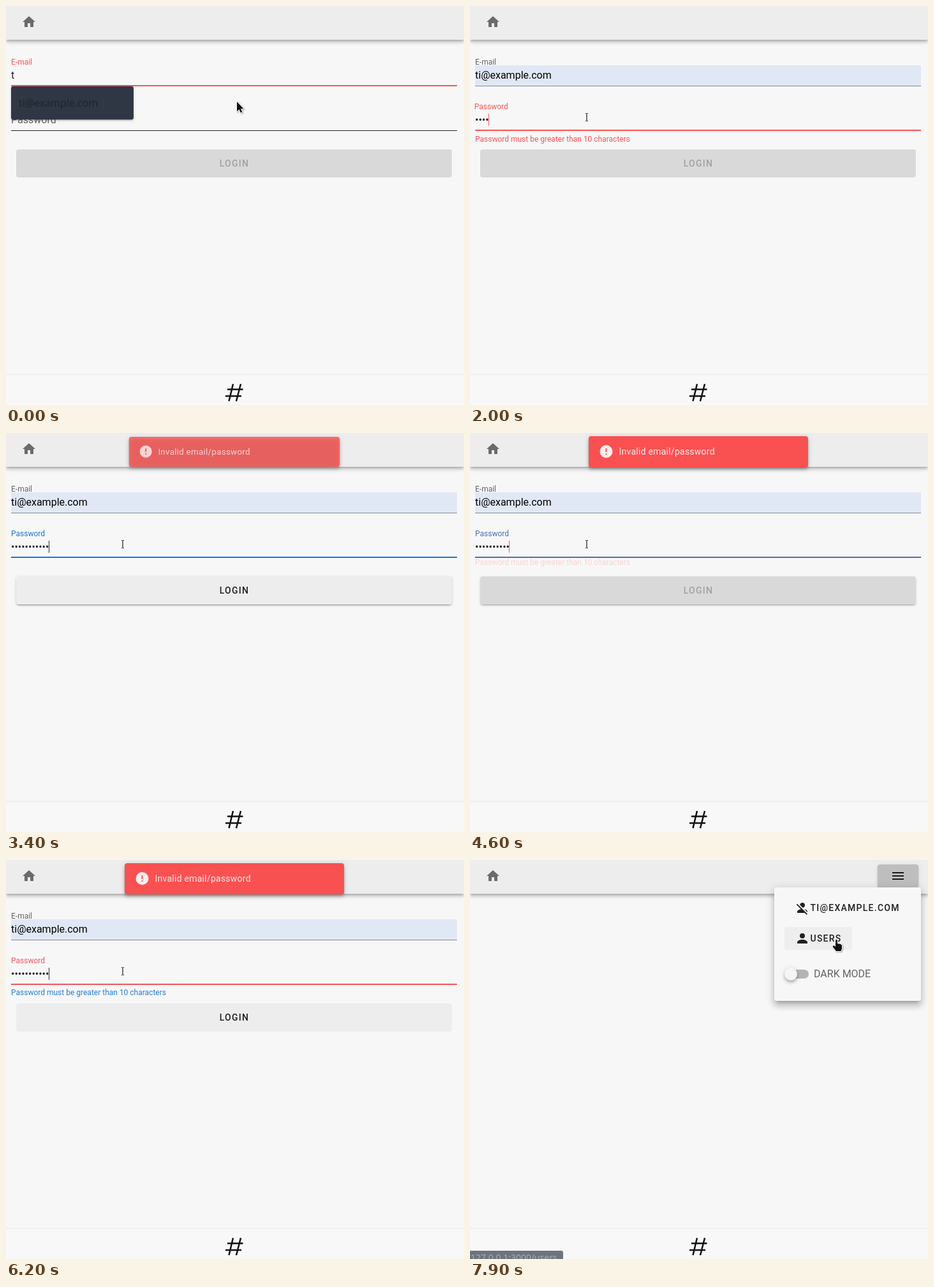
Write an HTML page with a canvas that moves like this. It is 718 by 626 pixels and loops after 8 s.

```html
<!DOCTYPE html>
<html lang="en">
<head>
<meta charset="utf-8">
<title>Login form</title>
<style>
html, body { margin: 0; width: 100%; height: 100%; overflow: hidden; background: #f7f7f7; }
canvas { display: block; }
</style>
</head>
<body>
<canvas id="stage" width="718" height="626"></canvas>
<script>
const ctx = document.getElementById('stage').getContext('2d');
const LOOP = 8000;
const MAIL = 'ti@example.com';
const RED = [255, 82, 82], BLUE = [25, 118, 210], GREY = [102, 102, 102];
const INK = 'rgba(0,0,0,.87)';
const ROBOTO = 'Roboto, sans-serif', UI = '"Open Sans", "Noto Sans", sans-serif';

// Moments of the story, in ms
const PICK = 600, FOCUS = 930, SNACK = 3333, NAV = 6560, MENU = 7380, HOVER = 7760;
const typing = [[FOCUS, 0], [1490, 1], [1680, 2], [1850, 3], [1980, 4], [2080, 5], [2180, 6], [2280, 7],
  [2380, 9], [2680, 10], [2930, 11], [4580, 10], [4680, 9], [4890, 10], [5170, 11],
  [5790, 10], [5880, 9], [6050, 10], [6195, 11]];
const validity = [[-999, false], [1490, true], [2930, false], [4580, true], [5170, false], [5790, true], [6195, false]];
const pointer = [[30, 362, 150], [560, 170, 150], [650, 170, 150], [880, 181, 172], [6850, 181, 172],
  [7250, 671, 25], [7450, 671, 25], [7830, 573, 125]];

const icons = {
  home: 'M10,20V14H14V20H19V12H22L12,3L2,12H5V20H10Z',
  menu: 'M3,6H21V8H3V6M3,11H21V13H3V11M3,16H21V18H3V16Z',
  alert: 'M13,13H11V7H13M13,17H11V15H13M12,2A10,10 0 0,0 2,12A10,10 0 0,0 12,22A10,10 0 0,0 22,12A10,10 0 0,0 12,2Z',
  user: 'M12,4A4,4 0 0,1 16,8A4,4 0 0,1 12,12A4,4 0 0,1 8,8A4,4 0 0,1 12,4M12,14C16.42,14 20,15.79 20,18V20H4V18C4,15.79 7.58,14 12,14Z',
  userOff: 'M12,4A4,4 0 0,1 16,8C16,9.95 14.6,11.58 12.75,11.93L8.07,7.25C8.42,5.4 10.05,4 12,4M12.28,14L18.28,20L20,21.72L18.73,23L15.73,20H4V18C4,16.16 6.5,14.61 9.87,14.14L2.78,7.05L4.05,5.78L12.28,14M20,18V19.18L15.14,14.32C18,14.93 20,16.35 20,18Z',
  arrow: 'M0,0V15.5L3.6,12.2L6,17.6L8.3,16.6L6,11.3H10.5Z',
  hand: 'M0,1Q1.5,-1.4 3,1V6L8,7Q10,7.5 10,10V14L8.5,18H1L-4.5,11Q-4,8.5 -1.8,9.5L0,11Z'
};
for (const k in icons) icons[k] = new Path2D(icons[k]);

const clamp = v => Math.max(0, Math.min(1, v));
const lerp = (a, b, k) => a + (b - a) * k;
const mix = (a, b, k) => `rgb(${a.map((v, i) => Math.round(lerp(v, b[i], k)))})`;

function bezier(x1, y1, x2, y2) {
  const at = (u, a, b) => 3 * (1 - u) * (1 - u) * u * a + 3 * (1 - u) * u * u * b + u * u * u;
  return x => {
    let lo = 0, hi = 1;
    for (let i = 0; i < 20; i++) {
      const m = (lo + hi) / 2;
      if (at(m, x1, x2) < x) lo = m; else hi = m;
    }
    return at(lo, y1, y2);
  };
}
const swing = bezier(.25, .8, .5, 1), ease = bezier(.25, .1, .25, 1);
const decel = bezier(0, 0, .2, 1), smooth = bezier(.42, 0, .58, 1);
const run = (t, from, ms, curve = swing) => curve(clamp((t - from) / ms));
const latest = (list, t) => list.filter(e => e[0] <= t).pop();

function text(s, x, y, size, color, o = {}) {
  ctx.font = `${o.weight || 400} ${size}px ${o.font || ROBOTO}`;
  ctx.letterSpacing = (o.gap || 0) + 'px';
  ctx.fillStyle = color;
  ctx.fillText(s, x, y);
}

function rect(x, y, w, h, color, r = 0) {
  ctx.fillStyle = color;
  ctx.beginPath();
  ctx.roundRect(x, y, w, h, r);
  ctx.fill();
}

// Each layer: offset, blur, spread, alpha
const low = [[3, 1, -2, .2], [2, 2, 0, .14], [1, 5, 0, .12]];
const mid = [[2, 4, -1, .2], [4, 5, 0, .14], [1, 10, 0, .12]];
const high = [[5, 5, -3, .2], [8, 10, 1, .14], [3, 14, 2, .12]];

function shadow(x, y, w, h, r, layers, k = 1) {
  const far = 2000, scale = ctx.getTransform().a || 1;
  for (const [dy, blur, spread, a] of layers) {
    ctx.save();
    ctx.shadowColor = `rgba(0,0,0,${a * k})`;
    ctx.shadowBlur = blur;
    ctx.shadowOffsetX = far;
    ctx.shadowOffsetY = dy;
    rect(x - far / scale - spread, y - spread, w + 2 * spread, h + 2 * spread, '#000', r);
    ctx.restore();
  }
}

function icon(name, x, y, color) {
  ctx.save();
  ctx.translate(x, y);
  ctx.fillStyle = color;
  ctx.fill(icons[name], 'evenodd');
  ctx.restore();
}

function frame() {
  rect(0, 0, 718, 626, '#f7f7f7');
  shadow(0, 0, 718, 53, 0, mid);
  rect(0, 0, 718, 53, '#ededed');
  icon('home', 24, 13, '#6b6b6b');
  rect(0, 577, 718, 2, '#efefef');
  rect(0, 579, 718, 47, '#f8f8f8');
  ctx.strokeStyle = '#111';
  ctx.lineWidth = 2.5;
  ctx.beginPath();
  for (const [x1, y1, x2, y2] of [[347, 601.5, 371.5, 601.5], [344, 612, 369, 612], [356, 593, 349.5, 620], [368, 593, 361, 620]]) {
    ctx.moveTo(x1, y1);
    ctx.lineTo(x2, y2);
  }
  ctx.stroke();
}

// Focus line growing from the middle
function underline(y, k, color) {
  if (k > 0) rect(357.5 - 349.5 * k, y, 699 * k, 2, color);
}

function email(t) {
  const picked = t >= PICK, out = run(t, FOCUS, 300);
  const hue = t < FOCUS ? mix(RED, BLUE, run(t, PICK, 300)) : mix(BLUE, GREY, out);
  if (picked) rect(8, 93, 699, 32, '#e1e8f5');
  rect(8, 125, 699, 1, picked ? '#8389a0' : '#949494');
  underline(124, 1 - out, hue);
  text('E-mail', 8, 92, 12, hue);
  text(picked ? MAIL : 't', 8, 114, 16, picked ? '#000' : INK);
}

function shakeX(ms) {
  const p = ms / 600, stops = [0, 2, -2, 2, -2, 0];
  const at = [.59, .6, .7, .8, .9, 1];
  for (let i = 0; i < 5; i++)
    if (p >= at[i] && p < at[i + 1]) return lerp(stops[i], stops[i + 1], ease((p - at[i]) / (at[i + 1] - at[i])));
  return 0;
}

function password(t) {
  const focus = run(t, FOCUS, 300);
  const [since, bad] = latest(validity, t);
  const k = run(t, since, 300), err = bad ? k : 1 - k;
  const hot = since < 0 ? BLUE : null;
  const hue = hot ? mix(GREY, BLUE, focus) : mix(BLUE, RED, err);

  rect(8, 195, 699, 1, focus < 1 ? '#222' : '#777');
  underline(194, focus, hot ? mix(BLUE, BLUE, 0) : hue);
  const dx = bad && since < 2000 ? shakeX(t - since) : 0;
  ctx.save();
  ctx.translate(8 + dx, lerp(184, 162, focus));
  ctx.scale(lerp(1, .75, focus), lerp(1, .75, focus));
  text('Password', 0, 0, 16, hue);
  ctx.restore();

  if (t >= FOCUS) {
    const [last, n] = latest(typing, t);
    text('•'.repeat(n), 8, 184, 16, INK);
    if (Math.floor((t - last) / 600) % 2 === 0)
      rect(Math.floor(8 + n * 5.39), 169, 1, 19, bad ? mix(RED, RED, 0) : '#333');
  }
  if (!hot && err > 0) {
    ctx.globalAlpha = err;
    text('Password must be greater than 10 characters', 8, 213 - 8 * (1 - err), 12, mix(bad ? RED : BLUE, RED, 0));
    ctx.globalAlpha = 1;
  }
  const off = bad || hot;
  const lift = off ? (bad && since > 2000 ? 1 - run(t, since, 280) : 0) : run(t, since, 280);
  if (lift > 0) shadow(16, 225, 683, 44, 4, low, lift);
  rect(16, 225, 683, 44, off ? '#d9d9d9' : '#ededed', 4);
  text('LOGIN', 334.7, 252, 14, off ? 'rgba(0,0,0,.26)' : INK, { weight: 500, gap: 1.25 });
}

function popup() {
  shadow(8, 126, 192, 52, 3, low);
  rect(8, 126, 192, 52, '#2f3644', 3);
  text(MAIL, 20, 158, 16, '#202327', { font: UI });
}

function snackbar(t) {
  const k = run(t, SNACK, 150, decel), s = lerp(.8, 1, k);
  ctx.save();
  ctx.globalAlpha = k;
  ctx.translate(358, 29.5);
  ctx.scale(s, s);
  ctx.translate(-358, -29.5);
  shadow(186, 5, 344, 49, 4, mid);
  rect(186, 5, 344, 49, '#f95151', 4);
  icon('alert', 201.5, 17, 'rgba(255,255,255,.9)');
  text('Invalid email/password', 233.5, 34, 14, 'rgba(255,255,255,.87)', { gap: .25 });
  ctx.restore();
}

function status(s, w, alpha) {
  ctx.globalAlpha = alpha;
  rect(0, 613, w, 16, '#2f3644', [0, 3, 0, 0]);
  text(s, 1, 628.5, 14, '#c9ced6', { font: UI });
  ctx.globalAlpha = 1;
}

function menu(t) {
  const k = run(t, MENU, 300);
  if (k <= 0) return;
  ctx.save();
  ctx.globalAlpha = k;
  ctx.translate(477, 43);
  ctx.scale(k, k);
  ctx.translate(-477, -43);
  shadow(477, 43, 230, 178, 4, high);
  rect(477, 43, 230, 178, '#f7f7f7', 4);
  const label = { weight: 500, gap: 1.25 };
  icon('userOff', 509, 63, INK);
  text(MAIL.toUpperCase(), 533.5, 80, 14, INK, label);
  if (t >= HOVER) rect(493, 105, 106, 36, '#eeeeee', 4);
  icon('user', 509, 111, INK);
  text('USERS', 533.5, 128, 14, INK, label);
  rect(495, 172, 36, 14, '#b5b5b5', 7);
  shadow(493, 169, 20, 20, 10, mid);
  rect(493, 169, 20, 20, '#f5f5f5', 10);
  text('DARK MODE', 539, 184, 16, 'rgba(0,0,0,.6)');
  ctx.restore();
}

function home(t) {
  shadow(639, 7, 64, 36, 4, low);
  rect(639, 7, 64, 36, t >= MENU ? '#bebebe' : t > 7200 ? '#e2e2e2' : '#ededed', 4);
  icon('menu', 659, 13, INK);
  const load = run(t, 6640, 150, decel);
  if (load > 0 && t < 7300) {
    ctx.globalAlpha = 1 - run(t, 6950, 350, ease);
    rect(0, 0, 718 * load, 2, '#a678b8');
    ctx.globalAlpha = 1;
  }
  menu(t);
  if (t < 7150) status('Waiting for 127.0.0.1...', 240, clamp((t - NAV) / 270));
  if (t >= HOVER) status('127.0.0.1:3000/users', 146, clamp((t - HOVER) / 205));
}

function cursor(t) {
  const i = pointer.findIndex(p => p[0] > t);
  const b = pointer[i < 0 ? pointer.length - 1 : i], a = i < 1 ? b : pointer[i - 1];
  const k = a === b ? 0 : run(t, a[0], b[0] - a[0], smooth);
  const x = lerp(a[1], b[1], k), y = lerp(a[2], b[2], k);
  ctx.save();
  ctx.translate(Math.round(x), Math.round(y));
  ctx.lineJoin = 'round';
  if (t > 800 && t < NAV) {
    const beam = new Path2D('M0,-5.5H1.5M2.5,-5.5H4M2,-5V6M0,6.5H1.5M2.5,6.5H4');
    ctx.translate(0, 2);
    ctx.strokeStyle = '#fff';
    ctx.lineWidth = 3;
    ctx.stroke(beam);
    ctx.strokeStyle = '#111';
    ctx.lineWidth = 1.2;
    ctx.stroke(beam);
  } else {
    const shape = icons[t > 7200 ? 'hand' : 'arrow'];
    ctx.shadowColor = 'rgba(0,0,0,.35)';
    ctx.shadowBlur = 2;
    ctx.shadowOffsetX = ctx.shadowOffsetY = 1;
    ctx.strokeStyle = '#fff';
    ctx.lineWidth = 2;
    ctx.stroke(shape);
    ctx.shadowColor = 'transparent';
    ctx.fillStyle = '#111';
    ctx.fill(shape);
  }
  ctx.restore();
}

function draw() {
  const t = performance.now() % LOOP;
  frame();
  if (t < NAV) {
    email(t);
    password(t);
    if (t < PICK) popup();
    if (t >= SNACK) snackbar(t);
  } else home(t);
  cursor(t);
  requestAnimationFrame(draw);
}
draw();
</script>
</body>
</html>
```
